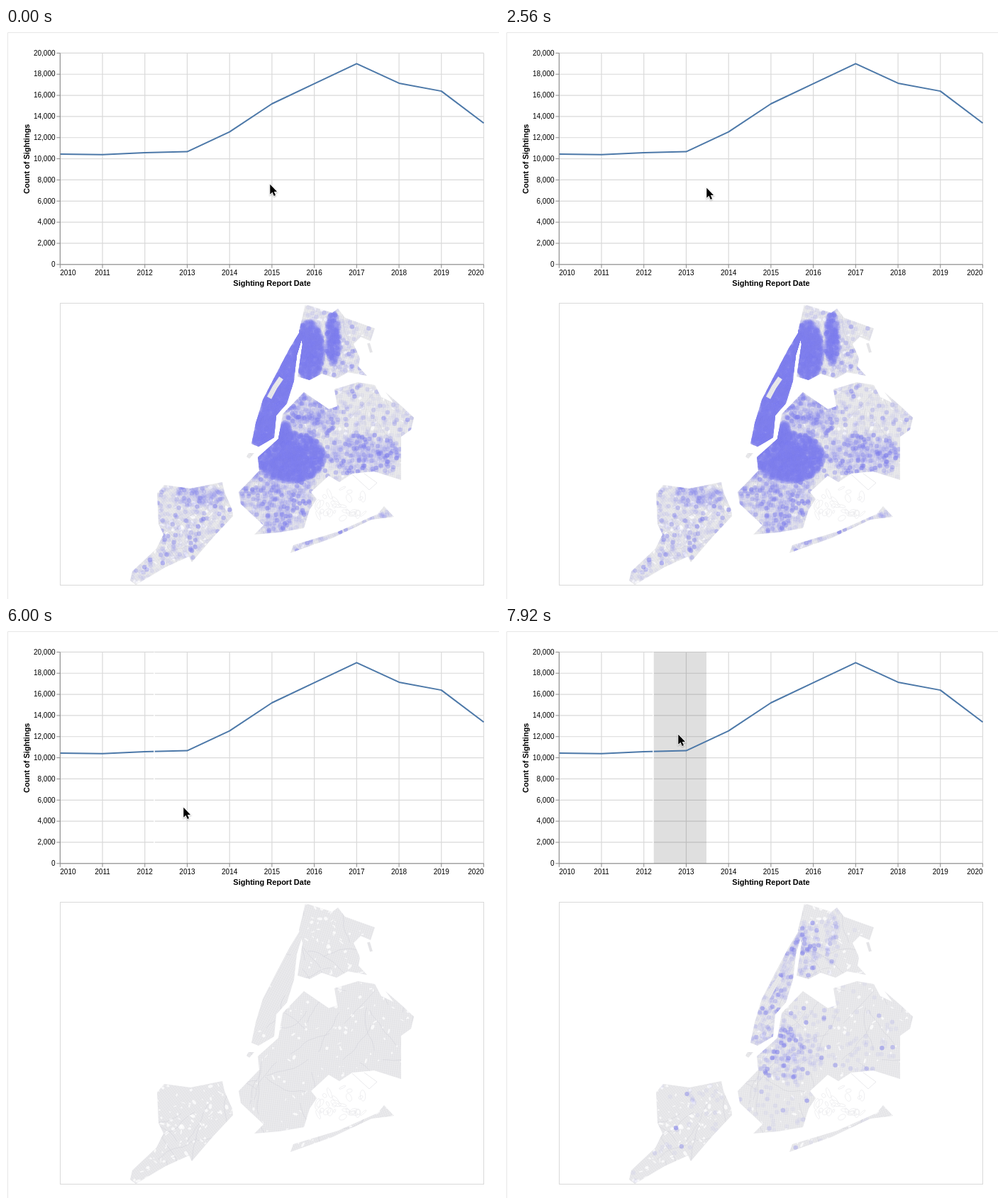
Recreate the animation shown at these times as an HTML page with a canvas. Size 695 by 806 pixels, loop 8 s.

```html
<!DOCTYPE html>
<html lang="en">
<head>
<meta charset="utf-8">
<title>Sightings by date</title>
<style>
html, body { margin: 0; width: 100%; height: 100%; overflow: hidden; background: #fff; }
canvas { display: block; }
</style>
</head>
<body>
<canvas id="stage" width="695" height="806"></canvas>
<script>
const W = 695, H = 806, LOOP = 8000, STEP = 80;
const LEFT = 76.3, RIGHT = 673.5, TOP = 35.4, BOTTOM = 333.8;
const CLEAR_AT = 4400, BRUSH_AT = 7920, BRUSH_X = 209, BRUSH_WIDTH = 75;
const stage = document.getElementById('stage').getContext('2d');

let seed = 7;
const rand = (a = 0, b = 1) => {
  seed = (seed * 1664525 + 1013904223) >>> 0;
  return a + (b - a) * seed / 4294967296;
};

function layer(draw) {
  const canvas = document.createElement('canvas');
  canvas.width = W;
  canvas.height = H;
  draw(canvas.getContext('2d'));
  return canvas;
}

function line(g, color, width, ...points) {
  g.strokeStyle = color;
  g.lineWidth = width;
  g.beginPath();
  points.forEach(([x, y]) => g.lineTo(x, y));
  g.stroke();
}

function blob(g, x, y, rx, ry = rx, turn = 0) {
  g.beginPath();
  g.ellipse(x, y, rx, ry, turn, 0, 7);
}

// A piece of land: its coast, street angle, share of open space and number of sightings
function region(coast, angle, gaps, sightings) {
  const n = coast.split(' ').map(Number);
  const xs = n.filter((_, i) => i % 2 === 0), ys = n.filter((_, i) => i % 2);
  const x0 = Math.min(...xs), x1 = Math.max(...xs), y0 = Math.min(...ys), y1 = Math.max(...ys);
  return {
    path: new Path2D('M' + coast + 'Z'), angle, gaps, sightings,
    cx: (x0 + x1) / 2, cy: (y0 + y1) / 2, size: (x1 - x0) * (y1 - y0),
    pick: () => [rand(x0, x1), rand(y0, y1)]
  };
}

const regions = [
  region('414 429 419 432 410 462 406 498 396 530 381 547 378 578 356 591 346 587 352 558 362 525 381 488 400 452', .5, .001, 4000),
  region('422 390 460 402 468 396 478 409 520 424 514 442 500 436 490 446 499 466 497 478 509 491 482 486 466 495 445 488 428 497 411 492 418 446 413 428', .3, .006, 350),
  region('390 545 420 514 455 538 467 534 463 510 496 500 520 504 529 521 546 529 535 514 558 534 575 550 571 567 557 577 557 638 519 626 488 629 470 641 455 632 430 655 438 665 428 680 420 706 385 712 350 715 363 702 331 672 328 655 357 625 355 606 384 580', .12, .003, 750),
  region('401 741 405 730 468 711 524 686 533 675 547 690 515 694 460 720', -.4, .01, 80),
  region('213 657 223 645 260 650 305 641 308 655 319 680 320 689 291 720 262 754 258 746 225 761 183 786 175 780 178 767 212 735 222 715 215 700', -.65, .009, 450),
  region('339 605 342 600 350 600 343 608', 0, 0, 0)
];

const land = layer(g => {
  for (const { path, angle, gaps, cx, cy, size, pick } of regions) {
    g.save();
    g.fillStyle = '#e4e4e7';
    g.fill(path);
    g.clip(path);
    g.save();
    g.translate(cx, cy);
    g.rotate(angle);
    for (let d = -170; d < 170; d += 3) {
      line(g, 'rgba(255,255,255,.3)', .7, [d, -170], [d, 170]);
      line(g, 'rgba(255,255,255,.2)', .6, [-170, d], [170, d]);
    }
    g.restore();
    // Parks
    g.fillStyle = 'rgba(255,255,255,.75)';
    for (let i = 0; i < size * gaps; i++) {
      blob(g, ...pick(), rand(.8, 2) ** 2, rand(.7, 1.6) ** 2, rand(0, 3));
      g.fill();
    }
    // Main roads
    for (let i = 0; i < size / 1500; i++) {
      let [x, y] = pick(), heading = rand(0, 6.3);
      const road = [];
      for (let k = 0; k < 9; k++) {
        road.push([x, y]);
        heading += rand(-.35, .35);
        x += 8 * Math.cos(heading);
        y += 8 * Math.sin(heading);
      }
      line(g, 'rgba(205,205,212,.6)', .8, ...road);
    }
    g.restore();
  }
  // Marshes, runways and a shore islet
  g.strokeStyle = '#e9e9eb';
  g.lineWidth = .7;
  for (let i = 0; i < 30; i++) {
    blob(g, rand(438, 505), rand(648, 692), rand(2, 8), rand(1, 4), rand(0, 3));
    g.stroke();
  }
  line(g, '#e4e4e7', .8, [488, 630], [512, 652], [523, 642], [505, 629]);
  line(g, '#e4e4e7', 4, [511, 445], [515, 458]);
});

// Hot spots: x, y, half width, half height, sightings
const clusters = [
  [428, 455, 20, 42, 2200], [461, 438, 10, 38, 800],
  [402, 606, 48, 35, 4200], [393, 574, 9, 18, 500],
  [430, 546, 39, 33, 480], [503, 600, 54, 27, 560],
  [380, 664, 52, 50, 750], [270, 660, 38, 15, 180]
];

function sightings(share) {
  return layer(g => {
    // Most dots are faint, a few mark places reported many times
    const dot = (x, y) => {
      g.fillStyle = `rgba(127,127,234,${.06 + .5 * rand() ** 8})`;
      blob(g, x, y, 3.2);
      g.fill();
    };
    g.save();
    const coast = new Path2D();
    regions.forEach(r => coast.addPath(r.path));
    g.clip(coast);
    for (const r of regions) {
      for (let left = r.sightings * share; left > 0;) {
        const [x, y] = r.pick();
        if (!g.isPointInPath(r.path, x, y)) continue;
        dot(x, y);
        left--;
      }
    }
    for (const [x, y, rx, ry, count] of clusters) {
      for (let i = 0; i < count * share; i++) {
        const a = rand(0, 2 * Math.PI), d = rand() ** .6;
        dot(x + rx * d * Math.cos(a), y + ry * d * Math.sin(a));
      }
    }
    g.restore();
    // The long park stays clear
    g.globalCompositeOperation = 'destination-out';
    line(g, '#000', 7, [388, 494], [379, 507], [371, 522]);
  });
}
const allSightings = sightings(1);
const brushedSightings = sightings(.06);

// Chart
const yearX = i => LEFT + (RIGHT - LEFT) * i / 10;
const countY = n => BOTTOM - n * (BOTTOM - TOP) / 20000;
const ticks = [...Array(11).keys()];

const grid = layer(g => {
  g.fillStyle = '#fff';
  g.fillRect(0, 0, W, H);
  line(g, '#e6e6e6', 1, [W, 6.5], [2.5, 6.5], [2.5, H]);
  g.strokeStyle = '#d9d9d9';
  g.strokeRect(76.5, 388.5, 597, 398);
  for (const i of ticks) {
    const x = yearX(i), y = countY(i * 2000);
    line(g, '#d9d9d9', 1.2, [x, TOP], [x, BOTTOM]);
    line(g, '#d9d9d9', 1.2, [LEFT, y], [RIGHT, y]);
  }
});

const chart = layer(g => {
  g.fillStyle = '#000';
  g.font = '10px "Liberation Sans", Arial, sans-serif';
  g.textBaseline = 'middle';
  for (const i of ticks) {
    const x = yearX(i), y = countY(i * 2000);
    line(g, '#888', 1, [x, BOTTOM], [x, BOTTOM + 5]);
    line(g, '#888', 1, [LEFT - 5, y], [LEFT, y]);
    g.textAlign = 'right';
    g.fillText((i * 2000).toLocaleString('en-US'), 69.5, y + .5);
    g.textAlign = i === 0 ? 'left' : i === 10 ? 'right' : 'center';
    g.fillText(2010 + i, x, 346.3);
  }
  line(g, '#888', 1, [LEFT, TOP], [LEFT, BOTTOM], [RIGHT, BOTTOM]);
  g.font = 'bold 11px "Liberation Sans", Arial, sans-serif';
  g.textAlign = 'center';
  g.fillText('Sighting Report Date', 375, 360.8);
  g.translate(29.8, 184.7);
  g.rotate(-Math.PI / 2);
  g.fillText('Count of Sightings', 0, 0);
});

const counts = [10450, 10400, 10570, 10670, 12550, 15200, 17100, 19000, 17150, 16400, 13370];
const curve = layer(g => {
  g.lineJoin = 'round';
  line(g, '#4c78a8', 2, ...counts.map((n, i) => [yearX(i), countY(n)]));
});

// Pointer glides: start, end, x, y
const glides = [
  [0, 320, 287, 208], [560, 1120, 208, 220], [1200, 1680, 278, 223], [1680, 2000, 284, 225],
  [5600, 6000, 250, 254], [6000, 6120, 226, 262], [6120, 6240, 202, 245],
  [6480, 6800, 187, 186], [7040, 7440, 226, 145], [7440, 7920, 244, 151]
];
const arrow = new Path2D('M0 0 0 14 3.2 11 5.5 16.2 7.7 15.2 5.5 10.2 9.7 10.2Z');

function drawPointer(t) {
  let x = 372, y = 220;
  for (const [start, end, toX, toY] of glides) {
    const p = Math.min(1, Math.max(0, (t - start) / (end - start)));
    x += (toX - x) * p;
    y += (toY - y) * p;
  }
  stage.save();
  stage.translate(x + .3, y + .8);
  stage.shadowColor = 'rgba(0,0,0,.3)';
  stage.shadowBlur = 2;
  stage.shadowOffsetY = 1;
  stage.strokeStyle = '#fff';
  stage.lineWidth = 1.6;
  stage.stroke(arrow);
  stage.shadowColor = 'transparent';
  stage.fillStyle = '#000';
  stage.fill(arrow);
  stage.restore();
}

function frame() {
  const t = Math.floor(performance.now() % LOOP / STEP) * STEP;
  const brushed = t >= BRUSH_AT;
  stage.drawImage(grid, 0, 0);
  if (brushed) {
    stage.fillStyle = 'rgba(51,51,51,.155)';
    stage.fillRect(BRUSH_X, TOP, BRUSH_WIDTH, BOTTOM - TOP);
  }
  stage.drawImage(curve, 0, 0);
  if (t >= CLEAR_AT) line(stage, '#fff', 1.5, [BRUSH_X, TOP], [BRUSH_X, BOTTOM]);
  stage.drawImage(chart, 0, 0);
  stage.drawImage(land, 0, 0);
  if (t < CLEAR_AT) stage.drawImage(allSightings, 0, 0);
  if (brushed) stage.drawImage(brushedSightings, 0, 0);
  drawPointer(t);
  requestAnimationFrame(frame);
}
frame();
</script>
</body>
</html>
```
